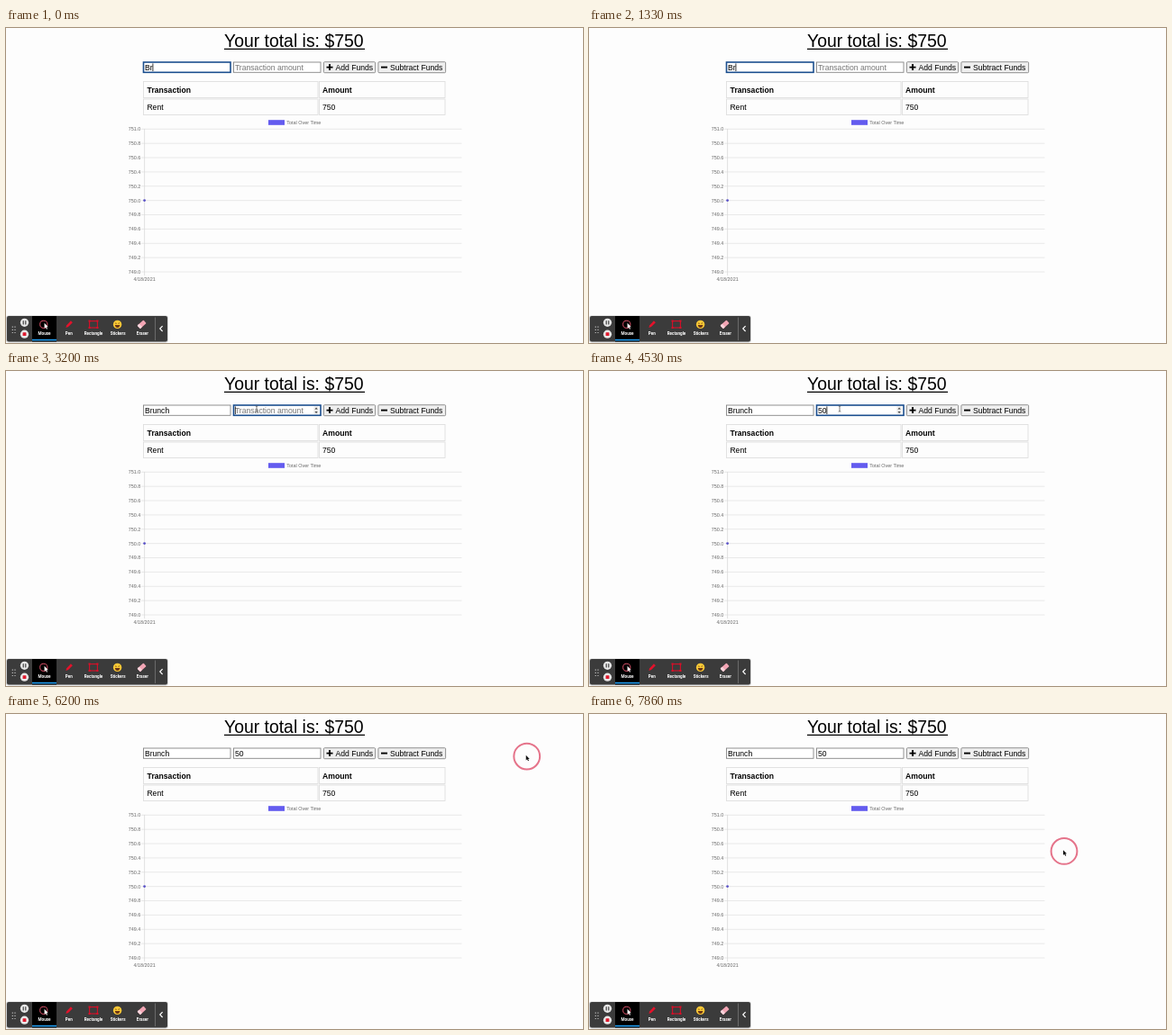
Recreate the animation shown at these times as an HTML page. Size 640x350 px, loop 8000 ms.

```html
<!DOCTYPE html>
<html lang="en">
<head>
<meta charset="utf-8">
<title>Total tracker</title>
<style>
  html, body { margin: 0; width: 100%; height: 100%; overflow: hidden; background: #fdfdfd; }
  svg { display: block; width: 100%; height: 100%; }
  text { font-family: "Liberation Sans", Arial, sans-serif; font-size: 8.65px; fill: #000; white-space: pre; }
  .chart text { font-size: 5.45px; fill: #666; }
  .bar text { font: 700 4.6px Roboto, sans-serif; fill: #fff; text-anchor: middle; }
  .bold { font-weight: 700; }
  .cell { fill: none; stroke: #dedede; stroke-width: .9; }
</style>
</head>
<body>
<svg id="stage" viewBox="0 0 640 350">
  <rect width="640" height="350" fill="#fdfdfd"/>
  <text x="242" y="21" style="font-size:19.4px">Your total is: $750</text>
  <path d="M242 23.3H398" stroke="#000" stroke-width="1.3"/>

  <g id="fields"></g>
  <g id="buttons"></g>

  <rect class="cell" x="152.5" y="59.5" width="193.5" height="18"/>
  <rect class="cell" x="347.5" y="59.5" width="139.5" height="18"/>
  <rect class="cell" x="152.5" y="79" width="193.5" height="17.5"/>
  <rect class="cell" x="347.5" y="79" width="139.5" height="17.5"/>
  <text class="bold" x="156.6" y="71.5">Transaction</text>
  <text class="bold" x="351" y="71.5">Amount</text>
  <text x="156.4" y="90.5">Rent</text>
  <text x="351" y="90.5">750</text>

  <g class="chart">
    <rect x="291" y="102.2" width="18" height="5.6" fill="#635bef"/>
    <text x="311.3" y="106.9">Total Over Time</text>
    <g id="grid"></g>
    <path d="M153.6 112V275" stroke="#d6d6d6" stroke-width=".7"/>
    <text x="153.6" y="280.9" text-anchor="middle">4/18/2021</text>
    <circle cx="153.6" cy="191.6" r="1.4" fill="#5a52c8"/>
  </g>

  <g class="bar">
    <rect x="0" y="319.4" width="180" height="30.2" rx="3" fill="#000" opacity=".18"/>
    <rect x="1" y="320" width="178" height="28.5" rx="2" fill="#3b3b3b"/>
    <rect x="29" y="320" width="27" height="28.5" fill="#000"/>
    <rect x="29" y="345.8" width="27" height="1.6" fill="#1e9bf0"/>
    <path d="M7.3 331.5v8M10 331.5v8" stroke="#bbb" stroke-width="1.2" stroke-dasharray="1.2 2"/>
    <circle cx="20.5" cy="327.3" r="4.6" fill="#e8e8e8"/>
    <path d="M19.2 325.2v4.2M21.8 325.2v4.2" stroke="#333" stroke-width="1.1"/>
    <circle cx="20.5" cy="340.2" r="4.6" fill="#e8e8e8"/>
    <rect x="18.6" y="338.3" width="3.8" height="3.8" rx=".4" fill="#e01b2f"/>
    <circle cx="41.8" cy="329.3" r="4.1" fill="none" stroke="#e0536b"/>
    <path d="M42.6 327.8v6l1.4-1.2 1 2.1 1-.5-1-2h1.8z" fill="#fff"/>
    <path d="M66.3 333l1-2.7 4.6-5 2 1.9-4.8 4.8z" fill="#e3122b"/>
    <rect x="92.6" y="325.6" width="8.8" height="7.4" fill="none" stroke="#d80f28" stroke-width="1.1"/>
    <path d="M91.5 325.6h2.2M100.3 325.6h2.2M91.5 333h2.2M100.3 333h2.2" stroke="#d80f28" stroke-width="2"/>
    <circle cx="123.6" cy="329.4" r="4.7" fill="#fcc936"/>
    <path d="M121.1 328.5q.8-1.4 1.6 0M124.5 328.5q.8-1.4 1.6 0" fill="none" stroke="#5c3a10" stroke-width=".8"/>
    <path d="M120.8 330h5.6q-.5 3-2.8 3t-2.8-3z" fill="#6b3514"/>
    <g transform="rotate(-42 150.5 329.4)">
      <rect x="146" y="327" width="9.3" height="4.8" rx=".8" fill="#f2a5b4"/>
      <rect x="146" y="327" width="3" height="4.8" rx=".8" fill="#f9d6dc"/>
    </g>
    <g id="tools"></g>
    <path d="M165.5 321.5V347" stroke="#777" stroke-width=".8"/>
    <path d="M173.6 331.2l-2.8 2.9 2.8 2.9" fill="none" stroke="#fff" stroke-width="1.2"/>
  </g>

  <g id="pointer">
    <circle id="ring" r="14.4" cx=".4" cy=".4" fill="none" stroke="#e5738a" stroke-width="2"/>
    <path id="arrow" d="M-.6-.8v5.6l1.3-1.1 1 2 1-.5-1-1.9h1.7z" fill="#111" stroke="#fff" stroke-width=".5" paint-order="stroke"/>
    <path id="beam" d="M-1.3-3.2q1.3 0 1.3.8 0-.8 1.3-.8M0-2.4V2.4M-1.3 3.2q1.3 0 1.3-.8 0 .8 1.3.8" fill="none" stroke="#444" stroke-width=".7"/>
  </g>
</svg>
<script>
const LOOP = 8000, FOCUS = 2950, BLUR = 6200;
const $ = id => document.getElementById(id);

function add(parent, tag, attrs, content = '') {
  const el = document.createElementNS('http://www.w3.org/2000/svg', tag);
  for (const k in attrs) el.setAttribute(k, attrs[k]);
  el.textContent = content;
  parent.append(el);
  return el;
}
const show = (el, on) => el.setAttribute('visibility', on ? 'visible' : 'hidden');

function makeField(x) {
  const g = $('fields');
  return {
    x, w: 97,
    box: add(g, 'rect', { x: x + .5, y: 38, width: 96.5, height: 11.3, fill: '#fff' }),
    label: add(g, 'text', { x: x + 1.9, y: 46.6 }),
    caret: add(g, 'rect', { y: 39.4, width: .8, height: 8.6 })
  };
}
function makeButton(x, w, label, icon) {
  const g = $('buttons');
  const box = add(g, 'rect', { x: x + .4, y: 37.7, width: w - .8, height: 12, rx: 1, stroke: '#777', 'stroke-width': .8 });
  add(g, 'path', { d: icon, stroke: '#000', 'stroke-width': 1.9 });
  add(g, 'text', { x: x + 13.4, y: 46.6 }, label);
  return { x, w, box };
}

const fields = [makeField(152), makeField(252)];
const spinner = add($('fields'), 'g', {});
add(spinner, 'rect', { x: 341.3, y: 39.3, width: 5.6, height: 8.8, rx: 1, fill: '#ececec' });
add(spinner, 'path', { d: 'M342.4 42.4l1.7-2 1.7 2zM342.4 45l1.7 2 1.7-2z', fill: '#444' });
const buttons = [
  makeButton(352, 58, 'Add Funds', 'M355.5 43.6h7M359 40.1v7'),
  makeButton(412.5, 75.5, 'Subtract Funds', 'M416 43.6h7')
];

for (let i = 0; i <= 10; i++) {
  const y = 112.3 + i * 15.87;
  add($('grid'), 'path', { d: `M149.8 ${y}H505.5`, stroke: '#e4e4e4', 'stroke-width': .8 });
  add($('grid'), 'text', { x: 149.3, y: y + 1.9, 'text-anchor': 'end' }, (751 - i * .2).toFixed(1));
}
['Mouse', 'Pen', 'Rectangle', 'Stickers', 'Eraser'].forEach((name, i) =>
  add($('tools'), 'text', { x: 42.6 + i * 27.2, y: 341.4 }, name));

// time, x, y
const path = [
  [2660, 205, 43], [2950, 278, 42], [5260, 278, 42], [5480, 446, 44], [5600, 446, 44],
  [5950, 578, 29], [6250, 577.3, 48], [7400, 577.3, 48], [7800, 526.6, 152]
];
function pointerAt(t) {
  const i = path.findIndex(p => p[0] > t);
  if (i < 0) return path[path.length - 1].slice(1);
  if (i === 0) return path[0].slice(1);
  const a = path[i - 1], b = path[i];
  const k = (t - a[0]) / (b[0] - a[0]), e = k * k * (3 - 2 * k);
  return [a[1] + (b[1] - a[1]) * e, a[2] + (b[2] - a[2]) * e];
}

// each key press: when it happens
const typing = [
  { text: 'Brunch', keys: [-50, -50, 1850, 2000, 2160, 2310] },
  { text: '50', keys: [3800, 4070] }
];

function drawField(i, t, focused) {
  const f = fields[i], { text, keys } = typing[i];
  const typed = keys.filter(k => k <= t);
  const value = text.slice(0, typed.length);
  f.label.textContent = value || 'Transaction amount';
  f.label.setAttribute('fill', '#000');
  f.label.style.fill = value ? '#000' : '#757575';
  f.box.setAttribute('stroke', focused ? '#1c4f8f' : '#858585');
  f.box.setAttribute('stroke-width', focused ? 1.6 : .9);
  const since = t - (typed.length ? typed[typed.length - 1] : FOCUS);
  const end = value ? f.label.getComputedTextLength() : 0;
  f.caret.setAttribute('x', f.x + 1.9 + end);
  show(f.caret, focused && since % 960 < 480);
}

function draw(t) {
  const [x, y] = pointerAt(t);
  const visible = t >= 2660;
  const over = c => visible && x >= c.x && x <= c.x + c.w && y > 37 && y < 50;
  const inField = fields.some(over);
  const second = t >= FOCUS && t < BLUR;

  drawField(0, t, t < FOCUS);
  drawField(1, t, second);
  show(spinner, second || over(fields[1]));
  for (const b of buttons) b.box.setAttribute('fill', over(b) ? '#dedede' : '#efefef');

  $('pointer').setAttribute('transform', `translate(${x} ${y})`);
  show($('arrow'), visible && !inField);
  show($('beam'), inField);
  show($('ring'), visible && !inField && !buttons.some(over));
}

const start = performance.now();
function tick() {
  draw((performance.now() - start) % LOOP);
  requestAnimationFrame(tick);
}
tick();
</script>
</body>
</html>
```
